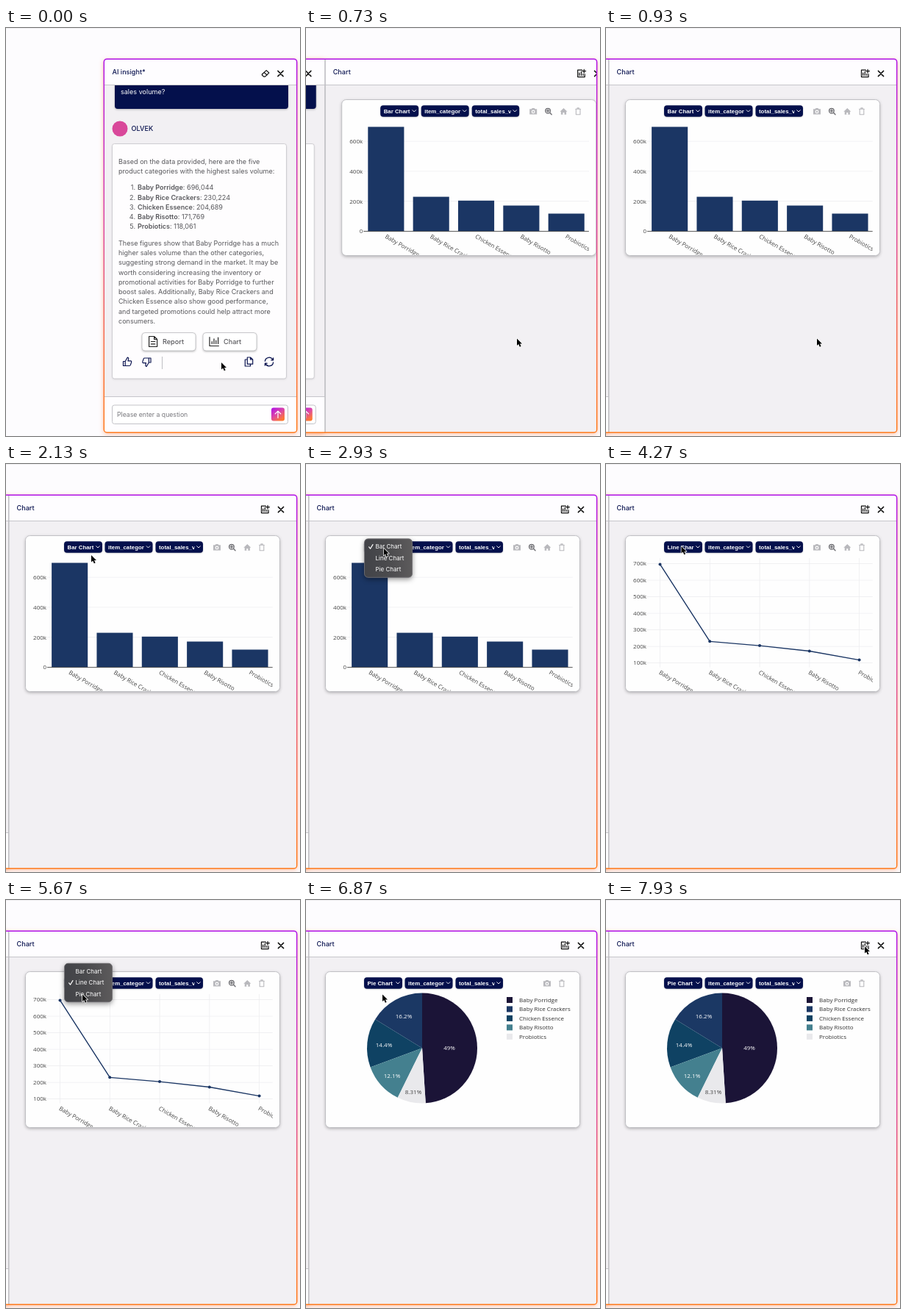
Write an HTML page with a canvas that moves like this. It is 400 by 555 pixels and loops after 8000 ms.

```html
<!DOCTYPE html>
<html lang="en">
<head>
<meta charset="utf-8">
<title>AI insight chart</title>
<style>
html, body { margin: 0; width: 100%; height: 100%; overflow: hidden; background: #fdfcfe; }
canvas { display: block; width: 400px; height: 555px; }
</style>
</head>
<body>
<canvas id="stage"></canvas>
<script>
const LOOP = 8000, W = 400, H = 555;
const canvas = document.getElementById('stage');
const ctx = canvas.getContext('2d');
const dpr = window.devicePixelRatio || 1;
canvas.width = W * dpr;
canvas.height = H * dpr;

const UI = 'Inter, sans-serif';
const PLOT = '8px "Open Sans", sans-serif';
const NAVY = '#04104c', INK = '#0b1450', GREY = '#58585c', PANE = '#f2f0f3', BAR = '#1b3664';

const names = ['Baby Porridge', 'Baby Rice Crackers', 'Chicken Essence', 'Baby Risotto', 'Probiotics'];
const sales = [696044, 230224, 204689, 171769, 118061];
const pieColors = ['#1b1437', '#1b3864', '#0f4263', '#44808f', '#e9e9ec'];

const clamp = v => Math.max(0, Math.min(1, v));
const ease = v => v * v * (3 - 2 * v);
const span = (t, a, b) => ease(clamp((t - a) / (b - a)));

function text(s, x, y, font, color, align = 'left') {
  ctx.font = font;
  ctx.fillStyle = color;
  ctx.textAlign = align;
  ctx.textBaseline = 'alphabetic';
  ctx.fillText(s, x, y);
}

function rect(x, y, w, h, color) {
  ctx.fillStyle = color;
  ctx.fillRect(x, y, w, h);
}

function box(x, y, w, h, r, fill, stroke, lw = 1) {
  ctx.beginPath();
  ctx.roundRect(x, y, w, h, r);
  if (fill) { ctx.fillStyle = fill; ctx.fill(); }
  if (stroke) { ctx.strokeStyle = stroke; ctx.lineWidth = lw; ctx.stroke(); }
}

function shadow(color, blur, dy, draw) {
  ctx.save();
  ctx.shadowColor = color;
  ctx.shadowBlur = blur * dpr;
  ctx.shadowOffsetY = dy * dpr;
  draw();
  ctx.restore();
}

function clipped(x, y, w, h, draw) {
  ctx.save();
  ctx.beginPath();
  ctx.rect(x, y, w, h);
  ctx.clip();
  draw();
  ctx.restore();
}

// Icon paths are drawn around their own centre.
function icon(d, x, y, color, lw = 1.2, fill = false) {
  ctx.save();
  ctx.translate(x, y);
  ctx.lineCap = ctx.lineJoin = 'round';
  ctx.lineWidth = lw;
  ctx.strokeStyle = ctx.fillStyle = color;
  const p = new Path2D(d);
  if (fill) ctx.fill(p, 'evenodd');
  else ctx.stroke(p);
  ctx.restore();
}

const ICON = {
  close: 'M-3.6-3.6L3.6 3.6M3.6-3.6L-3.6 3.6',
  eraser: 'M-4.6 1L1.2-4.4L4.8-1L-.4 4.2H-2.4L-4.6 2ZM-1.8-1.6L2 2',
  thumb: 'M-5.5-.5H-2.8V5.5H-5.5ZM-2.8-.5L.2-5.8Q2-5.6 1.6-3.6L1-1.2H4.6Q6-1 5.6.6L4.4 4.4Q4 5.5 3 5.5H-2.8',
  copy: 'M-2.2-6H2L5.2-3V3.2H-2.2ZM2-6V-3H5.2M-2.2-3H-5.2V6H2V3.2',
  refresh: 'M-5.6-.8A5.6 5.6 0 0 1 5-2.6M5.6.8A5.6 5.6 0 0 1-5 2.6M5.6-5V-2.2H2.8M-5.6 5V2.2H-2.8',
  doc: 'M-5.4-7H1.6L5.6-3V7H-5.4ZM1.6-7V-3H5.6M-2.6 0H2.8M-2.6 3.4H2.8',
  bars: 'M-6-6V6H6.4M-2.8 3V.2M0 3V-3.6M2.8 3V-1.4M5.6 3V-5.4',
  addChart: 'M1-4.6H-5V4.8H4.6V1M-2.8 2.6V-.8M-.2 2.6V-2.4M2.3 2.6V.8M3.6-5.4V-.8M1.3-3.1H5.9',
  camera: 'M-5-3H-2.4L-1.6-4.4H1.6L2.4-3H5V4.2H-5ZM-2.4.6A2.4 2.4 0 1 0 2.4.6A2.4 2.4 0 1 0-2.4.6ZM-1.2.6A1.2 1.2 0 1 0 1.2.6A1.2 1.2 0 1 0-1.2.6Z',
  zoom: 'M-4.2-.8A3.3 3.3 0 1 0 2.4-.8A3.3 3.3 0 1 0-4.2-.8M1.6 1.6L4.2 4.2M-2.4-.8H.6M-.9-2.3V.7',
  home: 'M0-4.6L5 .2H3.6V4.2H1V1.4H-1V4.2H-3.6V.2H-5Z',
  trash: 'M-3.4-3H3.4M-1.2-3V-4.4H1.2V-3M-2.8-3V4.4H2.8V-3',
  chevron: 'M-2.3-1.1L0 1.2L2.3-1.1',
  check: 'M-2.6.4L-.8 2.8L2.6-2.8',
  up: 'M0 4.6V-4.4M-3.8-.8L0-4.6L3.8-.8'
};

function brandGradient(x0, y0, x1, y1) {
  const g = ctx.createLinearGradient(x0, y0, x1, y1);
  g.addColorStop(0, '#b012e8');
  g.addColorStop(.45, '#dc48a4');
  g.addColorStop(.8, '#fb7440');
  g.addColorStop(1, '#ff7a1c');
  return g;
}

function header(x, w, title) {
  rect(x, 43, w, 34, '#fefdff');
  rect(x, 77, w, 1, '#c6c5ca');
}

function actionButton(x, label, glyph) {
  shadow('rgba(0,0,0,.28)', 3, 1.2, () => box(x, 414.5, 73, 24.5, 4, '#fff'));
  box(x, 414.5, 73, 24.5, 4, null, '#bdbdc1', .8);
  icon(glyph, x + 15, 426.5, '#222', 1.2);
  text(label, x + 28, 429.8, '500 9.1px ' + UI, GREY);
}

const summary = [
  'These figures show that Baby Porridge has a much',
  'higher sales volume than the other categories,',
  'suggesting strong demand in the market. It may be',
  'worth considering increasing the inventory or',
  'promotional activities for Baby Porridge to further',
  'boost sales. Additionally, Baby Rice Crackers and',
  'Chicken Essence also show good performance,',
  'and targeted promotions could help attract more',
  'consumers.'
];

function drawChat() {
  const body = '9.05px ' + UI, bold = '600 9.05px ' + UI;
  rect(133, 43, 263, 507, PANE);
  header(133, 263);
  text('AI insight*', 144.5, 63, '500 9.1px ' + UI, INK);
  icon(ICON.eraser, 353, 62, '#111', 1.2);
  icon(ICON.close, 373.5, 62, '#111', 1.5);

  clipped(133, 78, 263, 424, () => {
    shadow('rgba(0,0,0,.25)', 3, 1, () => box(148, 60, 236, 50, 4, NAVY));
    text('Which five categories have the highest', 156, 76.4, body, '#fff');
    text('sales volume?', 156, 89.8, body, '#fff');
  });

  ctx.beginPath();
  ctx.arc(155, 137, 10.5, 0, 7);
  ctx.fillStyle = '#d9489a';
  ctx.fill();
  text('OLVEK', 170.5, 140.3, '500 9.1px ' + UI, INK);

  shadow('rgba(0,0,0,.12)', 3, 1, () => box(144.5, 157.5, 237, 319.5, 3, '#fefdfe'));
  box(144.5, 157.5, 237, 319.5, 3, null, '#cbcace', .9);
  text('Based on the data provided, here are the five', 153, 184.7, body, GREY);
  text('product categories with the highest sales volume:', 153, 198, body, GREY);
  names.forEach((name, i) => {
    const y = 220.3 + i * 13.25;
    text(i + 1 + '.', 176, y, body, GREY, 'right');
    text(name, 179, y, bold, GREY);
    const w = ctx.measureText(name).width;
    text(': ' + sales[i].toLocaleString('en-US'), 179 + w, y, body, GREY);
  });
  summary.forEach((line, i) => text(line, 153, 295.8 + i * 13.25, body, GREY));

  actionButton(185, 'Report', ICON.doc);
  actionButton(268, 'Chart', ICON.bars);
  icon(ICON.thumb, 165, 454, INK, 1.2);
  ctx.save();
  ctx.translate(191.5, 454.5);
  ctx.rotate(Math.PI);
  icon(ICON.thumb, 0, 0, INK, 1.2);
  ctx.restore();
  rect(212, 447, 1, 17, '#bfbfc4');
  icon(ICON.copy, 330.5, 454, INK, 1.2);
  icon(ICON.refresh, 358, 454, INK, 1.3);

  rect(133, 502, 263, 48, '#fefdff');
  rect(133, 501, 263, 1, '#c6c5ca');
  box(144.5, 513, 239, 25.5, 3, '#fff', '#c3c3c8', 1);
  text('Please enter a question', 151, 528.6, '8.7px ' + UI, '#77777c');
  box(361, 516.5, 18, 18, 3, brandGradient(363, 516, 377, 536));
  icon(ICON.up, 370, 525.7, '#fff', 1.2);
}

function drawSelect(x, w, label) {
  shadow('rgba(0,0,0,.25)', 2, .6, () => box(x, 105.3, w, 15.4, 4, NAVY));
  clipped(x, 105, w - 11.5, 16, () =>
    text(label, x + 4.5, 116, 'bold 7.85px "Liberation Sans", Arial, sans-serif', '#fff'));
  icon(ICON.chevron, x + w - 6, 112.8, '#fff', .9);
}

function axisLabels(x0, step) {
  clipped(27, 277, 336, 31.6, () => names.forEach((name, i) => {
    ctx.save();
    ctx.translate(x0 + i * step - 2, 285.2);
    ctx.rotate(Math.PI / 6);
    text(name, 0, 0, PLOT, '#444');
    ctx.restore();
  }));
}

function yAxis(from, to, step, yOf) {
  for (let k = from; k <= to; k += step) {
    if (k) rect(56, yOf(k) - .35, 306.7, .7, '#ebebee');
    text(k ? k + 'k' : '0', 55, yOf(k) + 2.8, PLOT, '#444', 'right');
  }
}

function barChart() {
  const yOf = k => 276.6 - k * .2042, step = 61.34;
  yAxis(0, 600, 200, yOf);
  sales.forEach((v, i) => {
    const y = yOf(v / 1000);
    rect(62.1 + i * step, y, 49.1, 276.6 - y, BAR);
  });
  rect(56, 276.2, 306.7, .9, '#444');
  axisLabels(86.7, step);
}

function lineChart() {
  const yOf = k => 293.2 - k * .2253, step = 67.78, x0 = 73.5;
  const pts = sales.map((v, i) => [x0 + i * step, yOf(v / 1000)]);
  for (const [x] of pts) rect(x - .35, 128, .7, 148.6, '#ebebee');
  yAxis(100, 700, 100, yOf);
  ctx.beginPath();
  pts.forEach(p => ctx.lineTo(...p));
  ctx.strokeStyle = BAR;
  ctx.lineWidth = 1.4;
  ctx.lineJoin = 'round';
  ctx.stroke();
  for (const [x, y] of pts) {
    ctx.beginPath();
    ctx.arc(x, y, 2, 0, 7);
    ctx.fillStyle = BAR;
    ctx.fill();
  }
  axisLabels(x0, step);
}

function pieChart() {
  const cx = 158, cy = 201.5, r = 75, top = -Math.PI / 2;
  const total = sales.reduce((a, b) => a + b);
  const shares = ['49%', '16.2%', '14.4%', '12.1%', '8.31%'];
  const spots = [[195, 201], [133, 158], [106, 197], [117, 239], [146, 261]];
  const sweep = v => v / total * Math.PI * 2;
  const slice = (i, a, b) => {
    ctx.beginPath();
    ctx.moveTo(cx, cy);
    ctx.arc(cx, cy, r, a, b);
    ctx.fillStyle = pieColors[i];
    ctx.fill();
  };
  slice(0, top, top + sweep(sales[0]));
  let end = top;
  for (let i = 1; i < 5; i++) {
    const start = end - sweep(sales[i]);
    slice(i, start, end);
    end = start;
  }
  names.forEach((name, i) => {
    const y = 136 + i * 12.45;
    text(shares[i], spots[i][0], spots[i][1] + 2.9, PLOT, i === 4 ? '#444' : '#fff', 'center');
    rect(273, y - 4, 8, 8, pieColors[i]);
    text(name, 290, y + 2.8, PLOT, '#333');
  });
}

const kinds = ['Bar Chart', 'Line Chart', 'Pie Chart'];
const charts = [barChart, lineChart, pieChart];

function drawChartPane(kind) {
  rect(4, 43, 392, 507, PANE);
  header(4, 392);
  rect(3, 43, 1.2, 507, '#bab9be');
  text('Chart', 14.5, 63, '500 9.1px ' + UI, INK);
  icon(ICON.addChart, 352.5, 61.8, '#111', 1.25);
  icon(ICON.close, 374, 62, '#111', 1.5);

  shadow('rgba(0,0,0,.3)', 4, 1.5, () => box(26.5, 97.5, 346, 212, 6, '#fff'));
  box(26.5, 97.5, 346, 212, 6, '#fefefe', '#bcbcc0', .9);
  charts[kind]();
  drawSelect(79, 52, kinds[kind]);
  drawSelect(134.5, 65, 'item_category');
  drawSelect(203.5, 64.5, 'total_sales_volume');

  const pale = '#b9b9bd';
  if (kind === 2) {
    icon(ICON.camera, 328, 113.3, pale, 1, true);
  } else {
    icon(ICON.camera, 287, 113.3, pale, 1, true);
    icon(ICON.zoom, 307.8, 113.5, '#77777b', 1.5);
    icon(ICON.home, 328.3, 113.5, pale, 1, true);
  }
  icon(ICON.trash, 348, 113.3, pale, 1.1);
}

function drawMenu(top, checked, alpha) {
  ctx.save();
  ctx.globalAlpha = alpha;
  shadow('rgba(0,0,0,.45)', 7, 2.5, () => box(79.5, top, 65, 52.5, 5, '#505052'));
  const g = ctx.createLinearGradient(79, 0, 145, 0);
  g.addColorStop(0, '#424348');
  g.addColorStop(.45, '#4a4a4d');
  g.addColorStop(1, '#5d5b5c');
  box(79.5, top, 65, 52.5, 5, g, '#7d7c80', .7);
  kinds.forEach((label, i) => {
    const y = top + 10.6 + i * 15.6;
    text(label, 94.5, y + 2.8, '8px ' + UI, '#fff');
    if (i === checked) icon(ICON.check, 88.3, y, '#fff', 1.2);
  });
  ctx.restore();
}

function drawPanel(t) {
  const open = span(t, 500, 770);
  const shift = -392.5 * open;
  const left = 133 + shift;
  const kind = t < 3900 ? 0 : t < 5840 ? 1 : 2;

  shadow('rgba(255,125,60,.5)', 6, 2, () => box(left, 42, 263, 508, 4, '#fff'));
  if (open > 0) shadow('rgba(255,125,60,.5)', 6, 2, () => box(left, 42, 396 - left, 508, 4, '#fff'));

  ctx.save();
  ctx.beginPath();
  ctx.roundRect(left, 42, 396 - left, 508, 4);
  ctx.clip();
  if (open < 1) {
    ctx.save();
    ctx.translate(392.5 + shift, 0);
    drawChartPane(kind);
    ctx.restore();
  } else {
    drawChartPane(kind);
  }
  clipped(left, 42, 263, 508, () => {
    ctx.translate(shift, 0);
    drawChat();
  });
  if (open > 0) rect(left + 262.6, 43, 1.2, 507, '#bab9be');
  ctx.restore();
  box(left + .3, 42.2, 395.4 - left, 508, 4, null, brandGradient(0, 42, 0, 550), 1.5);
}

// Cursor stops: time, x, y.
const stops = [
  [130, 293, 455], [450, 287, 422.5], [1330, 287, 422.5], [2130, 116, 124],
  [2200, 116, 124], [2430, 106, 114], [2850, 106, 114], [3370, 102.5, 127],
  [3870, 102.5, 127], [4200, 102.5, 112], [4870, 102.5, 112], [5270, 104, 128.5],
  [6870, 104, 128.5], [7670, 349, 67], [7730, 349, 67], [7930, 352, 63]
];

function cursorAt(t) {
  let a = stops[0];
  for (const b of stops) {
    if (t < b[0]) {
      const k = span(t, a[0], b[0]);
      return [a[1] + (b[1] - a[1]) * k, a[2] + (b[2] - a[2]) * k];
    }
    a = b;
  }
  return [a[1], a[2]];
}

function drawCursor(t) {
  const [x, y] = cursorAt(t);
  const arrow = 'M0 0V9.6L2.2 7.6L3.8 11.2L5.6 10.4L4 7H7Z';
  icon(arrow, x, y, '#fff', 1.5);
  icon(arrow, x, y, '#000', 1, true);
}

function draw(t) {
  ctx.setTransform(dpr, 0, 0, dpr, 0, 0);
  rect(0, 0, W, H, '#fdfcfe');
  rect(0, 0, W, 1, '#efeef0');
  drawPanel(t);
  if (t >= 2600 && t < 3880) drawMenu(101.8, 0, 1 - clamp((t - 3740) / 140));
  if (t >= 4740 && t < 5860) drawMenu(86.2, 1, 1 - clamp((t - 5720) / 140));
  drawCursor(t);
}

const begin = performance.now();
function tick() {
  draw((performance.now() - begin) % LOOP);
  requestAnimationFrame(tick);
}
tick();
</script>
</body>
</html>
```
